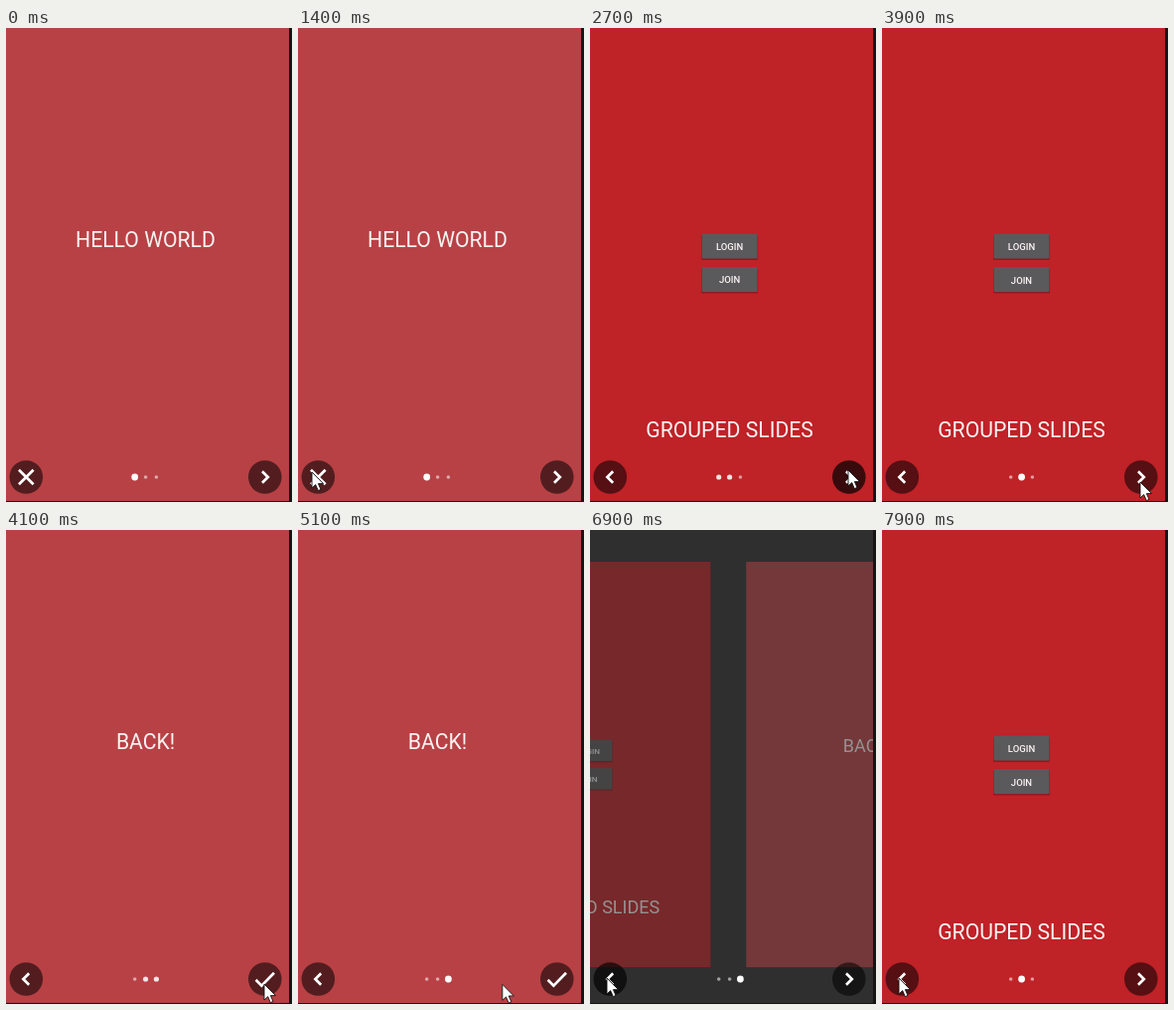
Recreate the animation shown at these times as an HTML page. Size 288x476 px, loop 8000 ms.

```html
<!DOCTYPE html>
<html lang="en">
<head>
<meta charset="utf-8">
<title>Intro slides</title>
<style>
  html, body { margin: 0; width: 100%; height: 100%; overflow: hidden; background: #171413; }
  svg { display: block; width: 288px; height: 476px; }
  text { font: 21.2px Roboto, sans-serif; fill: #fbf3f3; text-anchor: middle; }
  .btn text { font-size: 9.5px; font-weight: 500; }
  .btn rect { fill: #5a595b; }
  .btn .shade { fill: #000; opacity: .25; }
  .icon { fill: none; stroke: #fff; stroke-width: 2.7; }
</style>
</head>
<body>
<svg viewBox="0 0 288 476">
  <clipPath id="screen"><rect width="285" height="475"/></clipPath>
  <g clip-path="url(#screen)">
    <rect width="285" height="475" fill="#2f2f2f"/>
    <g class="page">
      <rect x="-4" y="-4" width="289" height="479" fill="#b84145"/>
      <text x="140.5" y="220.3">HELLO WORLD</text>
    </g>
    <g class="page">
      <rect x="-4" y="-4" width="289" height="479" fill="#bf2227"/>
      <g class="btn">
        <rect class="shade" x="112" y="208" width="57" height="25" rx="1"/>
        <rect x="112.5" y="206.5" width="56" height="25" rx="1"/>
        <text x="140.5" y="223">LOGIN</text>
      </g>
      <g class="btn">
        <rect class="shade" x="112" y="241.5" width="57" height="25" rx="1"/>
        <rect x="112.5" y="240" width="56" height="25" rx="1"/>
        <text x="140.5" y="256.5">JOIN</text>
      </g>
      <text x="140.5" y="411.3">GROUPED SLIDES</text>
    </g>
    <g class="page">
      <rect x="-4" y="-4" width="289" height="479" fill="#b84145"/>
      <text x="140.5" y="220.3">BACK!</text>
    </g>
    <circle class="dot" cx="129.7" cy="451" fill="#fff"/>
    <circle class="dot" cx="140.6" cy="451" fill="#fff"/>
    <circle class="dot" cx="151.4" cy="451" fill="#fff"/>
    <circle id="left" cx="20.3" cy="451" r="16.8"/>
    <circle id="right" cx="260.8" cy="451" r="16.8"/>
    <path class="icon" id="close" d="M13 443.7l14.6 14.6m0-14.6L13 458.3"/>
    <path class="icon" id="back" d="M23.2 445.2l-5.8 5.8 5.8 5.8"/>
    <path class="icon" id="next" d="M258 445.2l5.8 5.8-5.8 5.8"/>
    <path class="icon" id="done" d="M251.6 451.8l5.8 5.8 12.6-12.8"/>
  </g>
  <path id="cursor" d="M0 0V16L3.7 12.6 6.3 18.6 9 17.4 6.4 11.6H11.5Z" fill="#fff" stroke="#111" stroke-width=".9"/>
</svg>
<script>
const LOOP = 8000, W = 289, H = 479, CX = 140.5, CY = 235.5, MIN_SCALE = 0.85;
const $ = id => document.getElementById(id);
const pages = document.querySelectorAll('.page');
const dots = document.querySelectorAll('.dot');

// start time and direction of each page turn
const turns = [[2505, 1], [3905, 1], [6869, -1]];
// time, x, y of the pointer tip
const track = [
  [900, 270, 208], [1400, 14, 446], [1700, 14, 446], [2100, 140, 215],
  [2350, 250, 392], [2500, 260, 444], [2900, 260, 444], [3200, 260, 456],
  [4600, 260, 456], [6200, 87, 457], [6700, 17, 450], [LOOP, 17, 450]
];

const clamp = v => Math.min(1, Math.max(0, v));
const ramp = (t, from, to) => clamp((t - from) / (to - from));
const settle = v => 1 - (1 - v) ** 5;
const smooth = v => v * v * (3 - 2 * v);
const sumTurns = progress => turns.reduce((sum, [at, dir]) => sum + dir * progress(at), 0);
const pulse = (t, at) => ramp(t, at - 150, at - 50) * (1 - ramp(t, at + 150, at + 500));
const show = (el, on) => { el.style.display = on ? '' : 'none'; };

function drawPage(el, pos) {
  const visible = Math.abs(pos) < 1;
  show(el, visible);
  if (!visible) return;
  const s = Math.max(MIN_SCALE, 1 - Math.abs(pos));
  const shift = (W * (1 - s) - H * (1 - s) / 2) / 2;
  const x = CX + pos * W + (pos < 0 ? shift : -shift);
  el.setAttribute('transform', `translate(${x} ${CY}) scale(${s}) translate(${-CX} ${-CY})`);
  el.setAttribute('opacity', 0.5 + (s - MIN_SCALE) / (1 - MIN_SCALE) * 0.5);
}

function drawCursor(t) {
  show($('cursor'), t >= track[0][0]);
  const i = track.findIndex(k => k[0] > t);
  if (i < 1) return;
  const [t0, x0, y0] = track[i - 1], [t1, x1, y1] = track[i];
  const k = ramp(t, t0, t1);
  $('cursor').setAttribute('transform', `translate(${x0 + (x1 - x0) * k} ${y0 + (y1 - y0) * k})`);
}

function draw(t) {
  const scroll = sumTurns(at => settle(ramp(t, at, at + 250)));
  const selected = sumTurns(at => t >= at ? 1 : 0);
  const ink = sumTurns(at => smooth(ramp(t, at + 95, at + 295)));

  pages.forEach((el, i) => drawPage(el, i - scroll));
  dots.forEach((el, i) => {
    const near = clamp(1 - Math.abs(i - ink));
    el.setAttribute('r', 1.8 + 1.6 * near);
    el.setAttribute('opacity', 0.55 + 0.45 * Math.sqrt(near));
  });

  show($('close'), selected === 0);
  show($('back'), selected > 0);
  show($('next'), selected < 2);
  show($('done'), selected === 2);
  const lift = ramp(t, 1700, 1900) * (1 - ramp(t, 2500, 2600));
  $('left').setAttribute('opacity', 0.55 - 0.07 * lift + 0.1 * pulse(t, 6869));
  $('right').setAttribute('opacity', 0.55 + 0.17 * pulse(t, 2505));
  drawCursor(t);
}

const start = performance.now();
function tick() {
  draw((performance.now() - start) % LOOP);
  requestAnimationFrame(tick);
}
tick();
</script>
</body>
</html>
```
